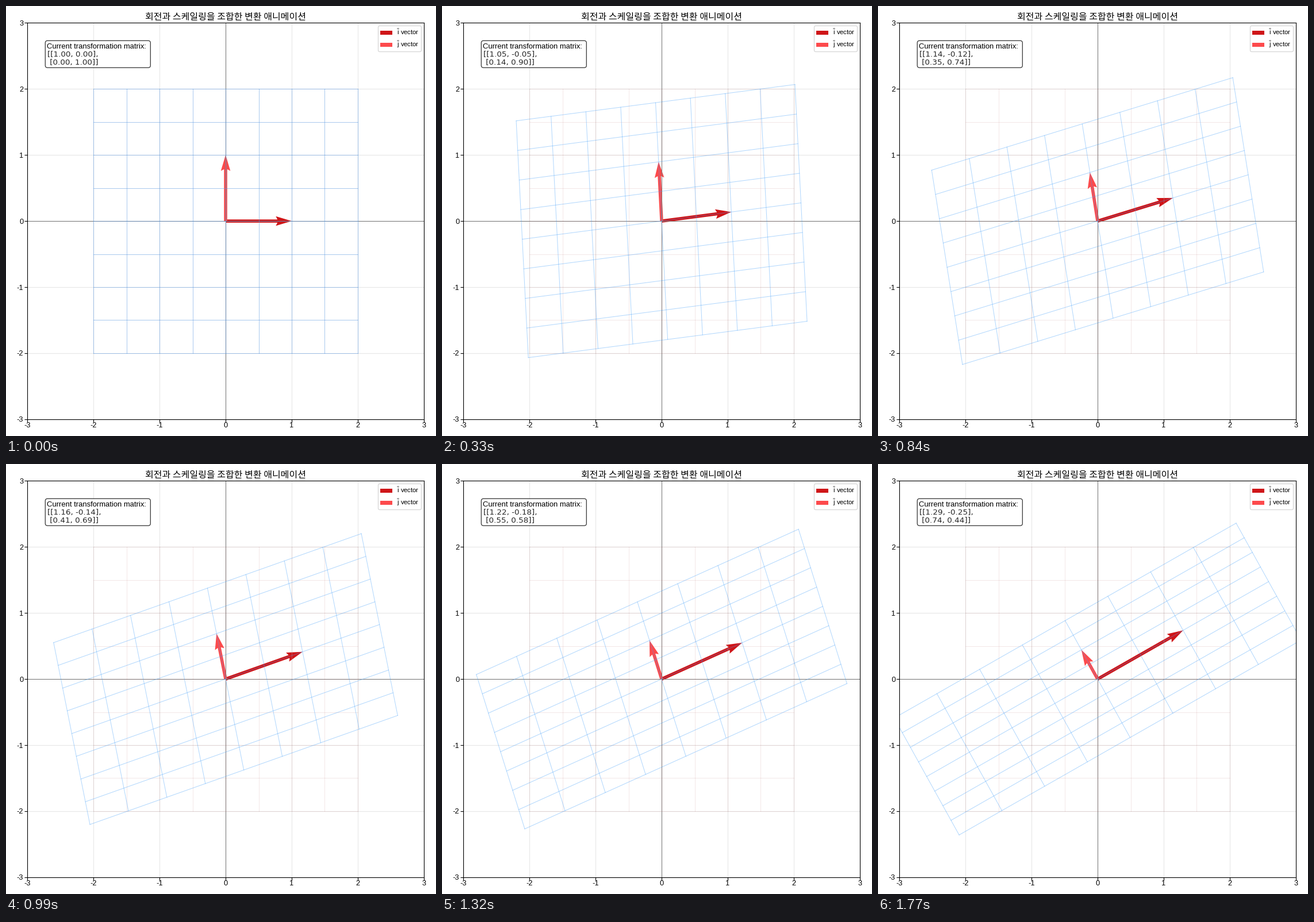
A matplotlib script that plays this animation: 748 by 748 pixels, repeating every 1.8 s.

```python
import numpy as np
import matplotlib.pyplot as plt
from matplotlib.animation import FuncAnimation
from matplotlib.patches import FancyBboxPatch, Rectangle
from matplotlib.transforms import Affine2D

SIZE = 748
SIDE = 689.5
LEFT, TOP = 37.3, 29.35
FRAMES = 60
I_RED, J_RED = "#cf1518", "#fd4a4c"
BLUE, PINK = "#45a0fa", "#b87070"

plt.rcParams.update({
    "font.family": "Liberation Sans",
    "axes.unicode_minus": False,
    "mathtext.fontset": "custom",
    "mathtext.rm": "Liberation Sans",
    "mathtext.it": "Liberation Sans",
})

# Rotation by 30 degrees combined with a scale of (1.5, 0.5)
angle = np.pi / 6
rotation = np.array([[np.cos(angle), -np.sin(angle)],
                     [np.sin(angle), np.cos(angle)]])
final = rotation @ np.diag([1.5, 0.5])

fig = plt.figure(figsize=(SIZE / 100, SIZE / 100), dpi=100, facecolor="white")
ax = fig.add_axes([LEFT / SIZE, 1 - (TOP + SIDE) / SIZE,
                   SIDE / SIZE, SIDE / SIZE])
ax.set(xlim=(-3, 3), ylim=(-3, 3), autoscale_on=False)
ax.set_xticks(range(-3, 4))
ax.set_yticks(range(-3, 4))
ax.tick_params(axis="x", labelsize=9.2, pad=0.3)
ax.tick_params(axis="y", labelsize=9.2, pad=1.6)
ax.grid(True, color="#b0b0b0", alpha=0.3, lw=0.8)
ax.axhline(0, color="#747474", lw=0.72)
ax.axvline(0, color="#747474", lw=0.72)

# Pixel coordinates with the origin at the top left
px = Affine2D().scale(1 / SIZE, -1 / SIZE).translate(0, 1) + fig.transFigure


def label(x, y, s, size, **kw):
    return ax.text(x, y, s, fontsize=size, transform=px, va="baseline",
                   zorder=6, **kw)


def panel(x, y, w, h, r, edge):
    ax.add_patch(FancyBboxPatch(
        (x, y), w, h, boxstyle=f"round,pad=0,rounding_size={r}",
        fc="white", ec=edge, lw=0.9, alpha=0.8, transform=px, zorder=4))


steps = np.linspace(-2, 2, 9)
segments = [np.array([[-2, 2], [s, s]]) for s in steps]
segments += [np.array([[s, s], [-2, 2]]) for s in steps]

for seg in segments:
    ax.plot(*seg, color=PINK, alpha=0.18, lw=0.65)
lines = [ax.plot(*seg, color=BLUE, alpha=0.42, lw=0.72)[0] for seg in segments]

arrows = ax.quiver([0, 0], [0, 0], [1, 0], [0, 1], color=[I_RED, J_RED],
                   angles="xy", scale_units="xy", scale=1, width=0.008)

label(382, 24, "회전과 스케일링을 조합한 변환 애니메이션", 11.5,
      ha="center", family="Noto Sans CJK JP")

panel(68.3, 60.3, 183, 47, 4, "black")
label(71.5, 73.5, "Current transformation matrix:", 9.4)
rows = [label(72, y, "", 9.7, family="DejaVu Sans", color="0.15")
        for y in (88, 102)]

panel(647.5, 34.5, 75, 45, 2.5, "0.8")
for y, name, color in ((43, "i", I_RED), (64, "j", J_RED)):
    ax.add_patch(Rectangle((651, y), 21, 7, fc=color, ec="none",
                           transform=px, zorder=5))
    label(680.5, y + 7, rf"$\hat{{{name}}}$ vector", 8.1)


def update(frame):
    t = frame / FRAMES
    m = (1 - t) * np.eye(2) + t * final
    for line, seg in zip(lines, segments):
        line.set_data(*(m @ seg))
    arrows.set_UVC(m[0], m[1])
    (a, b), (c, d) = m
    rows[0].set_text(f"[[{a:.2f}, {b:.2f}],")
    rows[1].set_text(f" [{c:.2f}, {d:.2f}]]")
    return [*lines, arrows, *rows]


anim = FuncAnimation(fig, update, frames=FRAMES, interval=30,
                     repeat=True, repeat_delay=0, blit=False)
plt.show()
```
